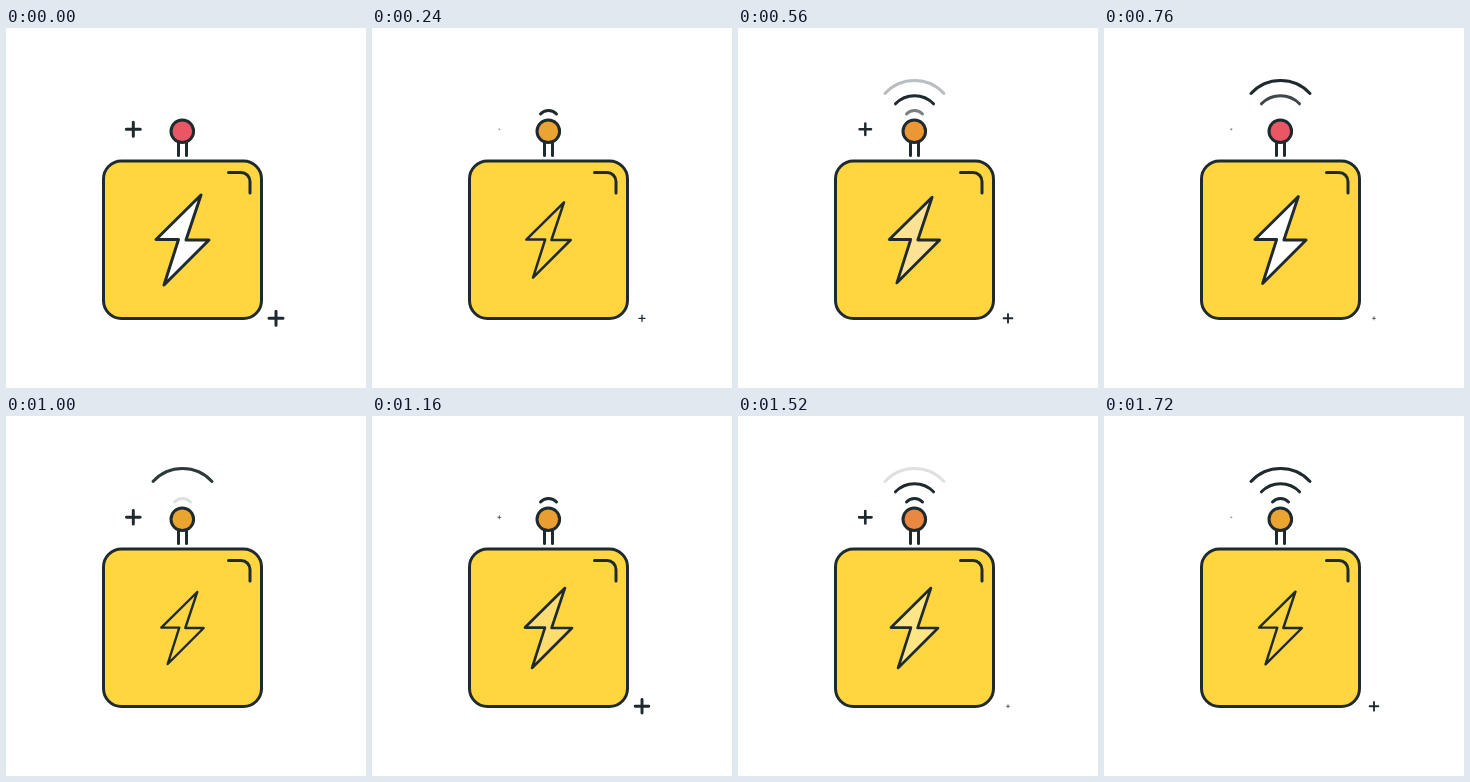
These frames come from a looping animation (360x360 px, 1760 ms). An HTML page:

```html
<!DOCTYPE html>
<html lang="en">
<head>
<meta charset="utf-8">
<title>Power beacon</title>
<style>
  html, body { margin: 0; width: 100%; height: 100%; overflow: hidden; background: #fff; }
  svg { display: block; width: 100vw; height: 100vh; }
</style>
</head>
<body>
<svg viewBox="0 0 360 360" fill="none" stroke="#1f2a2e" stroke-width="3" stroke-linecap="round" stroke-linejoin="round">
  <rect x="97.5" y="133" width="158" height="157.5" rx="18" fill="#ffd640"/>
  <path d="M222.5 144.5H235a9 9 0 0 1 9 9V165"/>
  <path d="M172.5 115V127.5M180.5 115V127.5"/>
  <circle id="ball" cx="176.3" cy="103.2" r="11.3"/>
  <path id="inner" d="M168.5 86A11 11 0 0 1 184.5 86"/>
  <path id="middle" d="M157.5 75.8A26.5 26.5 0 0 1 195.5 75.8"/>
  <path id="outer" d="M147 65.5A40 40 0 0 1 206 65.5"/>
  <path id="bolt" d="M18.5-45L-26.5-.5H-4L-18.5 45L26.5 0H3.5Z"/>
  <path id="plusLeft" d="M-7 0H7M0-7V7"/>
  <path id="plusRight" d="M-7 0H7M0-7V7"/>
</svg>
<script>
const LOOP = 1760, STEP = 40;
const PULSE = 670, TWINKLE = 488, BLINK = 500;
const parts = Object.fromEntries([...document.querySelectorAll('[id]')].map(el => [el.id, el]));

// Each row: time, then one or more values to interpolate linearly.
const waves = {
  inner: [[30, 0], [170, 1], [500, 1], [650, 0], [980, 0], [1120, 1]],
  middle: [[250, 0], [400, 1], [740, 1], [880, 0], [1260, 0], [1400, 1]],
  outer: [[515, 0], [665, 1], [990, 1], [1130, 0], [1500, 0], [1640, 1]]
};
const white = [255, 255, 255], yellow = [255, 214, 64], pale = [254, 226, 148];
const red = [235, 86, 100], amber = [233, 165, 47], orange = [235, 151, 54];
const cycle = (a, b, c) =>
  [[0, ...a], [110, ...a], [220, ...b], [410, ...b], [550, ...c], [655, ...c], [PULSE, ...a]];
const boltFill = cycle(white, yellow, pale);
const ballFill = cycle(red, amber, orange);

function sample(rows, t) {
  const next = rows.findIndex(row => row[0] > t);
  if (next === 0) return rows[0].slice(1);
  if (next < 0) return rows[rows.length - 1].slice(1);
  const a = rows[next - 1], b = rows[next];
  const k = (t - a[0]) / (b[0] - a[0]);
  return a.slice(1).map((v, i) => v + (b[i + 1] - v) * k);
}

const swing = (t, period) => (1 + Math.cos(2 * Math.PI * t / period)) / 2;
const rgb = values => `rgb(${values.map(Math.round).join()})`;
const place = (el, x, y, scale) =>
  el.setAttribute('transform', `translate(${x} ${y}) scale(${scale})`);

// Starts full, then shows a short pulse at the head of every period.
function blink(t) {
  if (t < 160) return 1;
  const phase = t % BLINK;
  return phase < 280 ? Math.sin(Math.PI * phase / 280) : 0;
}

function draw(t) {
  for (const name in waves) parts[name].style.opacity = sample(waves[name], t)[0];
  parts.bolt.style.fill = rgb(sample(boltFill, t % PULSE));
  parts.ball.style.fill = rgb(sample(ballFill, t % PULSE));
  place(parts.bolt, 176.5, 212, 0.8 + 0.2 * swing(t, PULSE));
  place(parts.plusLeft, 127.3, 101.3, 0.1 + 0.9 * swing(t, TWINKLE));
  place(parts.plusRight, 270, 290.3, blink(t));
}

const start = performance.now();
function tick() {
  const t = (performance.now() - start) % LOOP;
  draw(Math.floor(t / STEP) * STEP);
  requestAnimationFrame(tick);
}
tick();
</script>
</body>
</html>
```
